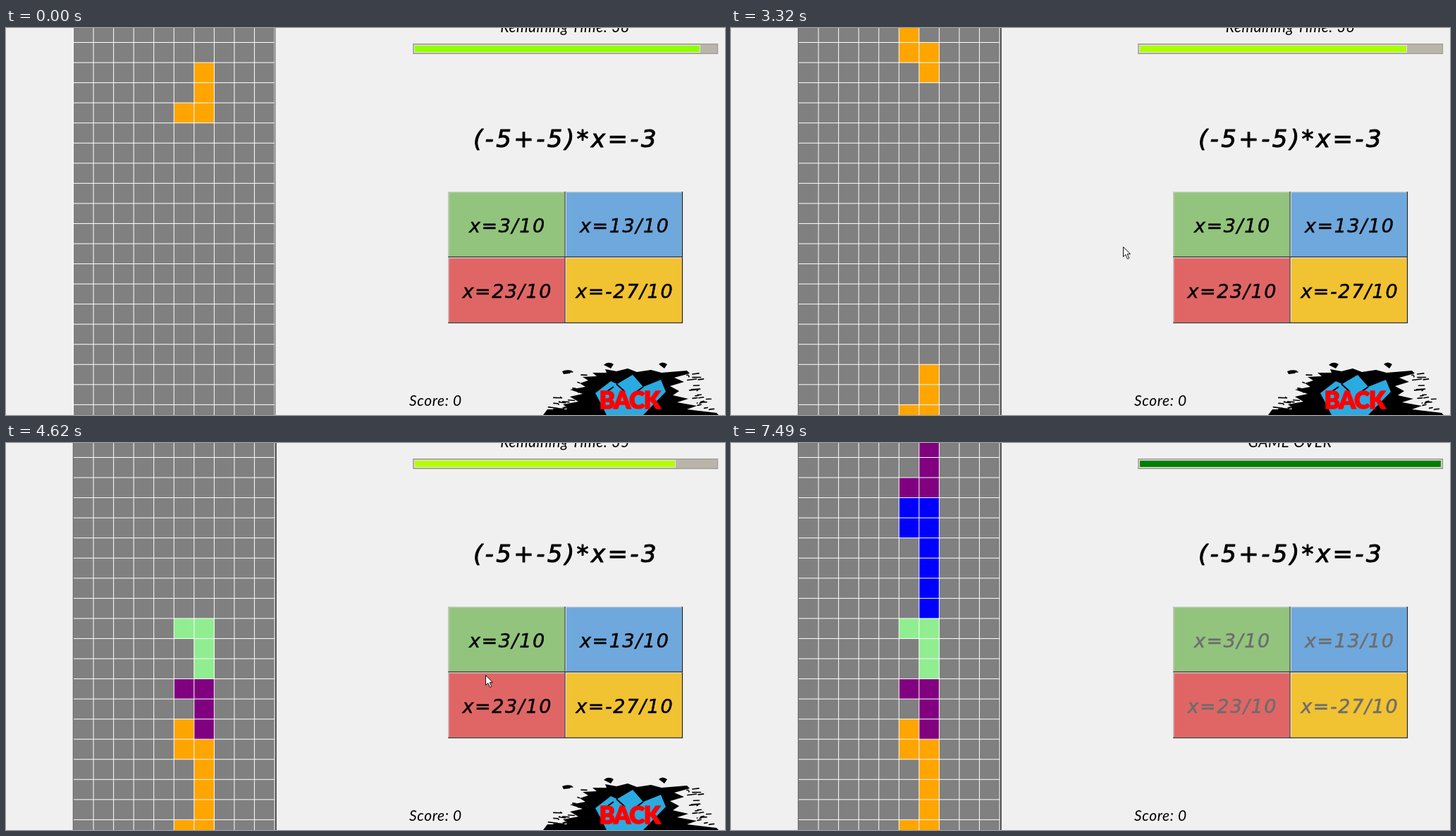
An HTML page that plays this animation: 1020x549 px, repeating every 8000 ms.

```html
<!DOCTYPE html>
<html lang="en">
<head>
<meta charset="utf-8">
<title>Equation blocks</title>
<style>
  html, body { margin: 0; width: 100%; height: 100%; overflow: hidden; background: #f0f0f0; }
  svg { display: block; width: 100vw; height: 100vh; }
  .hand { font-family: "DejaVu Sans", sans-serif; font-style: italic; text-anchor: middle;
          stroke-linejoin: round; }
  .sum { font-size: 34px; letter-spacing: 3.4px; fill: #000; stroke: #000; stroke-width: 1px; }
  .answer { font-size: 27px; letter-spacing: 1.6px; stroke-width: .5px; }
  .label { font: italic 21px Lato, sans-serif; letter-spacing: .6px; }
  .status { text-anchor: middle; }
  .back { font: 900 33px Lato, sans-serif; letter-spacing: -.9px; text-anchor: middle;
          fill: #f00; stroke: #f00; stroke-width: 1.6px; }
</style>
</head>
<body>
<svg viewBox="0 0 1020 549" xmlns="http://www.w3.org/2000/svg">
  <rect width="1020" height="549" fill="#f0f0f0"/>
  <rect x="95.5" width="285.5" height="549" fill="#808080"/>
  <g id="cells"></g>
  <path id="grid" stroke="#fff" fill="none"/>
  <g id="focus" fill="#484848">
    <rect x="94.8" width="1" height="549"/>
    <rect x="381.6" width="2.2" height="549"/>
  </g>
  <rect id="edge" x="381.3" width="1" height="549" fill="#484848"/>

  <text id="time" class="label status" x="793" y="6"></text>
  <rect x="577.2" y="22" width="433" height="15" fill="#a29e96"/>
  <rect x="578.5" y="23.3" width="430.4" height="12.4" fill="#bab5ab"/>
  <rect id="rim" x="579" y="24" height="11" fill="#e6e4de"/>
  <rect id="bar" x="580" y="25" height="9"/>

  <text class="hand sum" x="794.5" y="169">(-5+-5)*x=-3</text>
  <g id="buttons"></g>
  <g id="answers"></g>
  <text class="label" x="572" y="536">Score: 0</text>

  <g id="splash">
    <path d="M762 549 768 541 800 541 790 534 812 530 800 523 818 519 800 513 822 509 814 504 826 500 818 495 838 494 832 489 852 489 850 484 866 487 882 483 895 488 915 485 930 489 966 486 970 490 948 496 962 502 942 508 955 515 946 521 968 526 952 531 980 536 966 541 1008 546 1011 549Z"/>
    <path d="M789 487q6-3 14-1l-3 4-9 1zM848 478q6-6 14-1l-4 6zM926 477q5-5 12 0l-4 6z"/>
    <path id="bristles" stroke="#000" stroke-width="1.6" stroke-linecap="round"/>
    <path fill="#29abe2" d="M836 518 858 501 867 505 889 492 904 509 929 499 936 516 904 549H852L843 531Z"/>
    <path d="M866 505 878 516M904 509 893 517M852 516 862 509" stroke="#000" stroke-width="2"/>
    <text class="back" x="884.5" y="540">BACK</text>
  </g>
  <path id="cursor" d="M0 0V14L3.3 11 6 17 8.3 16 5.7 10.2H10Z" fill="#fff" stroke="#111"/>
</svg>
<script>
const LOOP = 8000, OVER = 5240, TICK = 76.6, CELL = 28.55;
const $ = id => document.getElementById(id);
const show = (id, on) => $(id).setAttribute('visibility', on ? 'visible' : 'hidden');
const rect = (x, y, w, h, fill) =>
  `<rect x="${x}" y="${y}" width="${w}" height="${h}" fill="${fill}"/>`;
const colX = c => 95.5 + CELL * c;
const rowY = r => -8.05 + CELL * r;

// Linear interpolation through [time, value] points
function track(points, t) {
  for (let i = 1; i < points.length; i++) {
    const [t0, a] = points[i - 1], [t1, b] = points[i];
    if (t <= t1) return a + (b - a) * Math.max(0, (t - t0) / (t1 - t0));
  }
  return points[points.length - 1][1];
}

const J = [[1, 0], [1, 1], [0, 2], [1, 2]];
const S = [[0, 0], [0, 1], [1, 1], [1, 2]];
const L = [[0, 0], [1, 0], [1, 1], [1, 2]];
const I = [[1, 0], [1, 1], [1, 2], [1, 3]];
const O = [[0, 0], [1, 0], [0, 1], [1, 1]];
const pieces = [
  { shape: J, color: '#ffa500', spawn: 0, drop: 2780, land: 17 },
  { shape: S, color: '#ffa500', spawn: 3010, drop: 3700, land: 14 },
  { shape: L, color: '#800080', spawn: 3860, drop: 4090, land: 12 },
  { shape: L, color: '#90ee90', spawn: 4240, drop: 4470, land: 9 },
  { shape: I, color: '#0000ff', spawn: 4700, drop: 4850, land: 5 },
  { shape: O, color: '#0000ff', spawn: 4930, drop: 5010, land: 3 },
  { shape: J, color: '#800080', spawn: 5160, drop: 5160, land: 0 }
];
const falls = [930, 1940, 2390];
const barEnd = [[0, 984], [700, 981], [1230, 976.5], [1860, 971.5], [2400, 966.5],
                [2700, 964], [3320, 958], [3780, 955], [4620, 949], [5240, 945]];
const cursorX = [[2700, 303], [3010, 556], [3860, 556], [4160, 680]];
const cursorY = [[2700, 291], [3010, 310], [3860, 310], [4160, 329]];

function build() {
  let grid = '';
  for (let c = 0; c <= 10; c++) grid += `M${colX(c)} 0V549`;
  for (let r = 1; r < 20; r++) grid += `M95 ${rowY(r)}H381.5`;
  $('grid').setAttribute('d', grid);

  const w = 166.4, h = 93.3;
  const options = [['x=3/10', '#93c47d'], ['x=13/10', '#6fa8dc'],
                   ['x=23/10', '#e06666'], ['x=-27/10', '#f1c232']];
  options.forEach(([label, color], i) => {
    const x = 627.3 + w * (i % 2), y = 232.2 + h * (i >> 1);
    $('buttons').innerHTML += rect(x, y, w, h, '#1c1c1c') +
      rect(x, y, w - 1.4, h - 1.4, '#f0f0f0') + rect(x + 1, y + 1, w - 2.4, h - 2.4, color);
    $('answers').innerHTML +=
      `<text class="hand answer" x="${x + w / 2 + .8}" y="${y + 57.4}">${label}</text>`;
  });

  // Ragged brush strokes on both sides of the blot
  let seed = 7, bristles = '';
  const rnd = () => (seed = seed * 16807 % 2147483647) / 2147483647;
  for (let i = 0; i < 46; i++) {
    const y = 488 + 58 * rnd(), side = i % 2 ? 1 : -1;
    const x = 890 + side * (64 + 24 * rnd() + (y - 488) * .45);
    bristles += `M${x.toFixed(1)} ${y.toFixed(1)}l${(side * rnd() * 13).toFixed(1)} ${
      (-1.5 * rnd()).toFixed(1)}`;
  }
  $('bristles').setAttribute('d', bristles);
}

function draw(t) {
  const over = t >= OVER;
  const focused = t >= 2240;
  show('focus', focused);
  show('edge', !focused);
  show('splash', !over);

  let cells = '';
  pieces.forEach((p, i) => {
    if (t < p.spawn) return;
    const row = t >= p.drop ? p.land : i ? 0 : 2 + falls.filter(f => t >= f).length;
    for (const [c, r] of p.shape) cells += rect(colX(5 + c), rowY(row + r), CELL, CELL, p.color);
  });
  $('cells').innerHTML = cells;

  const end = over ? 1007 : track(barEnd, Math.floor(t / TICK + .02) * TICK);
  const width = Math.round(end - 580);
  $('bar').setAttribute('width', width);
  $('rim').setAttribute('width', width + 2);
  $('bar').setAttribute('fill', over ? '#008000' : `rgb(${144 + 404 - width},255,0)`);
  $('time').textContent = over ? 'GAME OVER' : 'Remaining Time: ' + Math.ceil((end - 580) / 10.7);

  const ink = over ? '#6d6d6d' : '#000';
  $('answers').setAttribute('fill', ink);
  $('answers').setAttribute('stroke', ink);

  show('cursor', t >= 2240 && t < 6720);
  const cx = Math.round(track(cursorX, t)) + .5, cy = Math.round(track(cursorY, t)) + .5;
  $('cursor').setAttribute('transform', `translate(${cx} ${cy})`);
}

build();
const start = performance.now();
function loop() {
  draw((performance.now() - start) % LOOP);
  requestAnimationFrame(loop);
}
loop();
</script>
</body>
</html>
```
